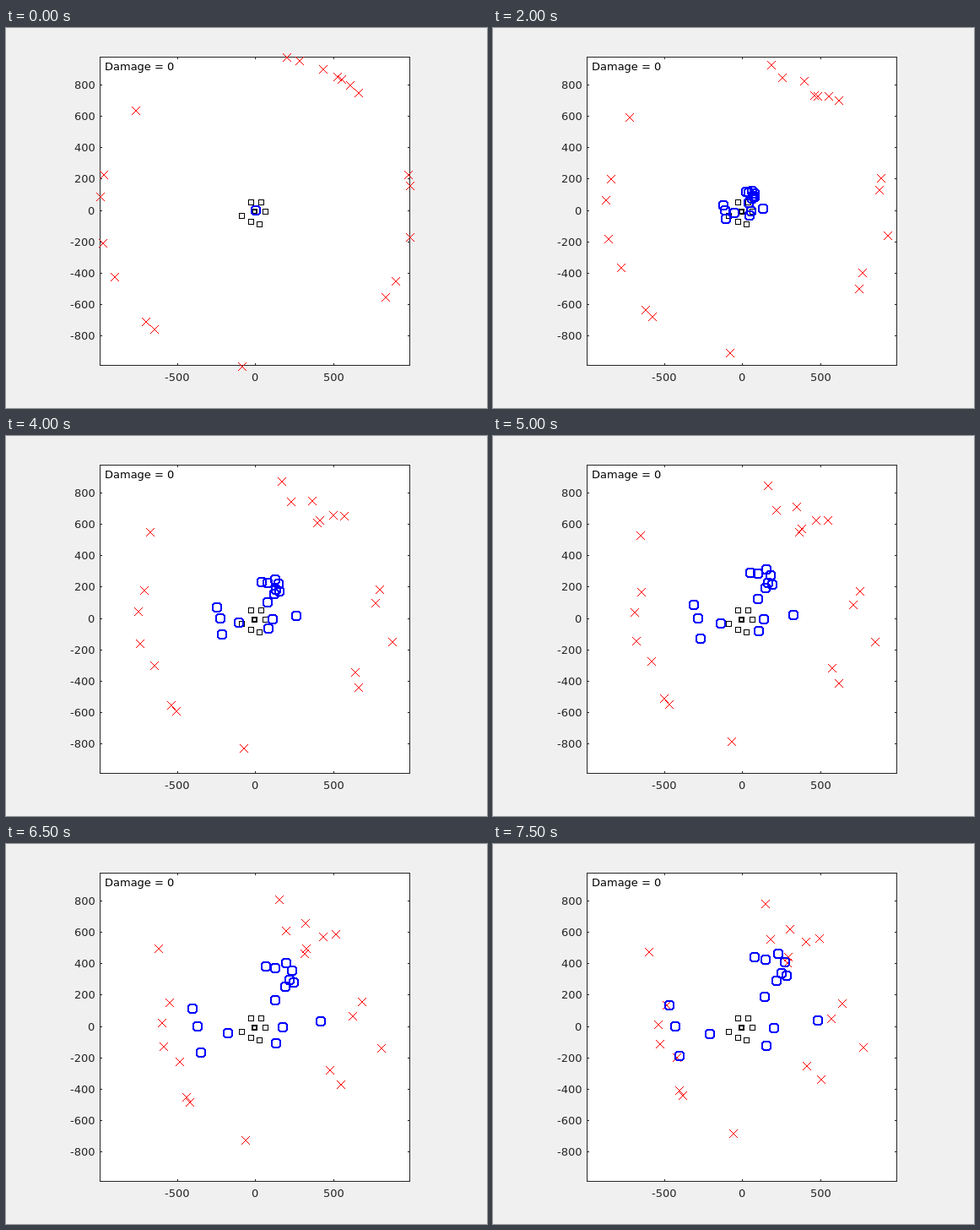
An HTML page with a canvas for the animation above (8 s loop, 570 px wide and 450 px high).

```html
<!DOCTYPE html>
<html>
<head>
<meta charset="utf-8">
<style>
html, body { margin: 0; width: 100%; height: 100%; overflow: hidden; background: #f0f0f0; }
canvas { display: block; }
</style>
</head>
<body>
<canvas id="stage" width="570" height="450"></canvas>
<script>
const ctx = document.getElementById('stage').getContext('2d');
const STEP = 500, STEPS = 16;
const BASE = { x: 296.3, y: 216.4 }, RADIUS = 185.2;
const BOX = { l: 111.5, t: 34.5, r: 478.5, b: 399.5 };
const TICK = 2.5;

// Each asset has its raiders: [bearing in degrees, share of the way covered, closing rate of each guard]
const assets = [
  { x: 290, y: 206, raids: [[166.8, .517, .983]] },
  { x: 302, y: 206, raids: [[64.5, .331, .83], [56.8, .503, .965], [53, .348, .69, .565],
                            [48.9, .27, .684], [229.5, .389]] },
  { x: 307, y: 217, raids: [] },
  { x: 294, y: 217, raids: [[13.2, .344], [-9.8, .213], [-33.7, .391], [265, .314],
                            [225.5, .427], [205.1, .541, .98], [192, .461, .67]], main: true },
  { x: 279, y: 222, raids: [[78.6, .191, .65]] },
  { x: 290, y: 229, raids: [[-26.8, .523, .711], [140.2, .228]] },
  { x: 300, y: 232, raids: [[73.8, .387, .87], [58.6, .477, .928], [9.1, .436, .913, .628],
                            [174.9, .447, .89]] }
];

function line(x1, y1, x2, y2) {
  ctx.beginPath();
  ctx.moveTo(x1, y1);
  ctx.lineTo(x2, y2);
  ctx.stroke();
}

// Places text on whole pixels; anchor is 0 for left, 0.5 for centre, 1 for right
function text(s, x, y, anchor) {
  ctx.fillText(s, Math.floor(x - ctx.measureText(s).width * anchor), y);
}

function axes() {
  const { l, t, r, b } = BOX;
  ctx.fillStyle = '#fff';
  ctx.fillRect(l, t, r - l, b - t);
  ctx.strokeStyle = ctx.fillStyle = '#262626';
  ctx.lineWidth = 1;
  ctx.strokeRect(l, t, r - l, b - t);
  ctx.font = '13px "DejaVu Sans", sans-serif';
  for (let v = -800; v <= 800; v += 200) {
    const y = Math.floor(216 - v * 0.1855) + 0.5;
    line(l, y, l + TICK, y);
    line(r - TICK, y, r, y);
    text(String(v), 106, y + 4.5, 1);
  }
  for (let v = -500; v <= 500; v += 500) {
    const x = Math.floor(295.5 + v * 0.185) + 0.5;
    line(x, b, x, b - TICK);
    line(x, t, x, t + TICK);
    text(String(v), x, 418, 0.5);
  }
  ctx.fillStyle = '#000';
  text('Damage = 0', 117, 50, 0);
}

function square(x, y, w) {
  ctx.lineWidth = w;
  ctx.strokeRect(x - 3 + w / 2, y - 3 + w / 2, 7 - w, 7 - w);
}

function cross(x, y) {
  for (let i = -5; i < 5; i++) {
    ctx.fillRect(x + i, y + i, 1, 1);
    ctx.fillRect(x + i, y - i - 1, 1, 1);
  }
}

// Stepped ring: four bars joined by corner blocks
function ring(x, y) {
  for (const s of [-6, 4]) {
    ctx.fillRect(x - 4, y + s, 8, 2);
    ctx.fillRect(x + s, y - 4, 2, 8);
  }
  for (const i of [-5, 3]) for (const j of [-5, 3]) ctx.fillRect(x + i, y + j, 2, 2);
}

function draw(p) {
  const raiders = [], guards = [];
  for (const { x, y, raids } of assets) {
    for (const [deg, pace, ...rates] of raids) {
      const a = deg * Math.PI / 180;
      const dx = RADIUS * Math.cos(a), dy = -RADIUS * Math.sin(a);
      const mx = (x - BASE.x - dx) * pace, my = (y - BASE.y - dy) * pace;
      const at = (kx, ky) => [Math.round(BASE.x + kx), Math.round(BASE.y + ky)];
      raiders.push(at(dx + mx * p, dy + my * p));
      // A guard keeps its raider on a constant bearing until they meet
      for (const k of rates) guards.push(at((dx * k + mx) * p, (dy * k + my) * p));
    }
  }

  ctx.fillStyle = '#f0f0f0';
  ctx.fillRect(0, 0, 570, 450);
  axes();
  ctx.strokeStyle = '#000';
  for (const s of assets) square(s.x, s.y, s.main ? 2 : 1);
  ctx.fillStyle = '#f00';
  for (const r of raiders) cross(...r);
  ctx.fillStyle = '#00f';
  for (const g of guards) ring(...g);
}

const start = performance.now();
function tick() {
  const t = Math.max(0, performance.now() - start);
  draw(Math.floor(t / STEP) % STEPS / (STEPS - 1));
  requestAnimationFrame(tick);
}
tick();
</script>
</body>
</html>
```
